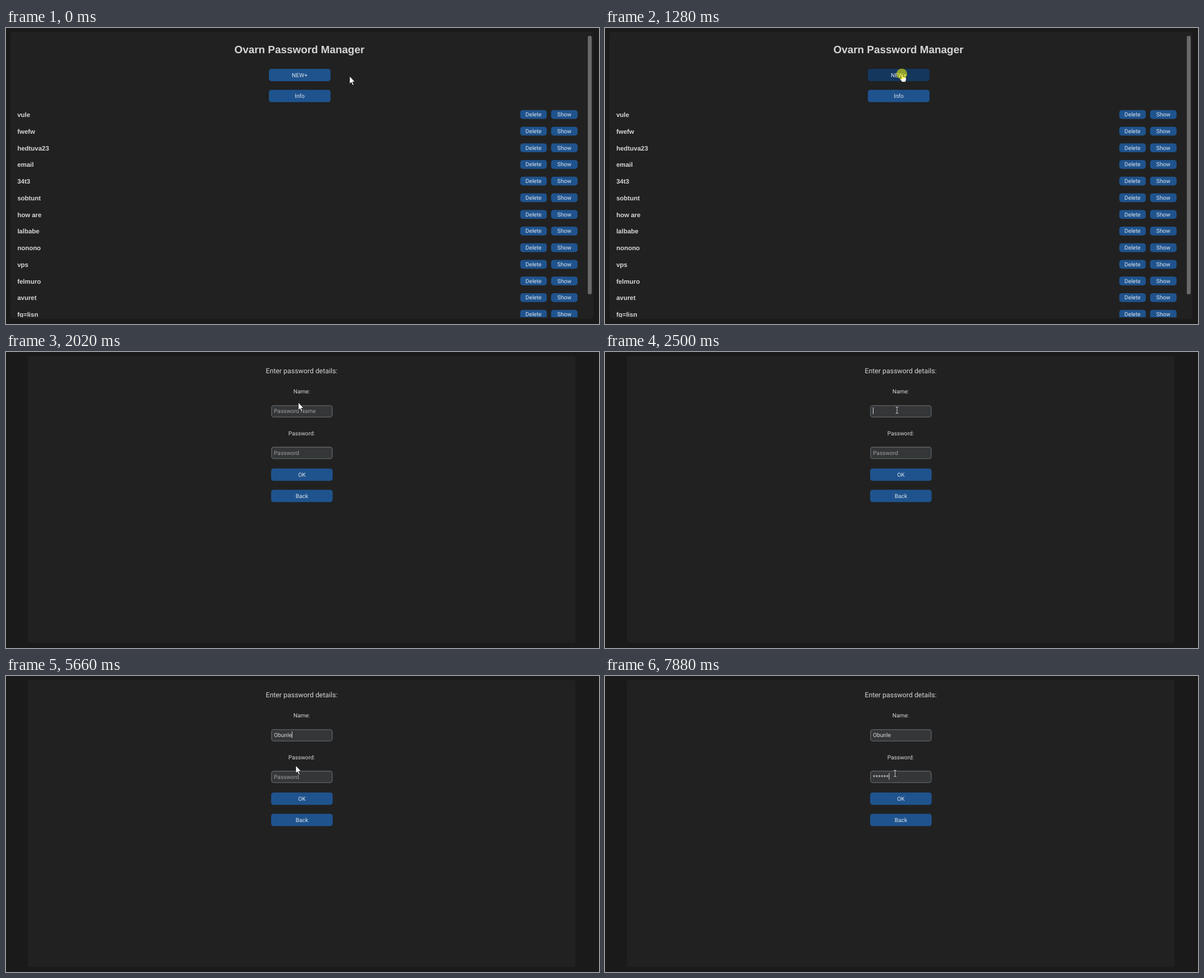
Animation of 1058x529 px, one loop 8000 ms. Source, as an HTML page:

```html
<!DOCTYPE html>
<html lang="en">
<head>
<meta charset="utf-8">
<title>Password manager</title>
<style>
  html, body { margin: 0; width: 100%; height: 100%; overflow: hidden; background: #1a1a1a; }
  svg { display: block; width: 1058px; height: 529px; }
  text { font: 10.2px Roboto, sans-serif; fill: #d6d6d6; text-rendering: geometricPrecision; white-space: pre; }
  .mid { text-anchor: middle; }
  .title { font: bold 18.9px "Liberation Sans", Arial, sans-serif; }
  .item { font: bold 11.45px "Liberation Sans", Arial, sans-serif; }
  .lead { font-size: 12.35px; }
  .cap { fill: #dce4ee; }
  .hint { fill: #9e9e9e; }
  .stars { letter-spacing: .35px; }
  .panel { fill: #212121; }
  .btn { fill: #1f538d; }
  .btn.hover { fill: #14375e; }
  .field { fill: #343638; stroke: #565b5e; stroke-width: 1.6; }
  .blank { fill: #1a1a1a; }
  .caret { fill: #d6d6d6; }
  .pointer { fill: #fff; stroke: #111; stroke-width: .8; stroke-linejoin: round; }
  .beam { fill: none; stroke: #c4c6c8; stroke-width: 1; }
</style>
</head>
<body>
<svg viewBox="0 0 1058 529">
  <defs><clipPath id="view"><rect width="1058" height="517"/></clipPath></defs>
  <g id="list">
    <rect class="panel" x="8" y="7" width="1040" height="513" rx="5"/>
    <rect x="1038" y="14" width="7" height="462" rx="3" fill="#696969"/>
    <g id="rows" clip-path="url(#view)"></g>
  </g>
  <g id="form">
    <rect class="panel" x="39" y="7" width="977" height="513" rx="4"/>
    <g id="blanks"></g>
    <g id="controls"></g>
  </g>
  <g id="mouse">
    <path id="arrow" class="pointer" d="M0 0V14L3.1 11.1L5.3 16.3L7.5 15.4L5.3 10.3H9.6Z"/>
    <path id="hand" class="pointer" d="M-1.3 1.2Q0 -.4 1.3 1.2V5.2Q2.6 4.4 3.4 5.6Q4.8 4.9 5.5 6.2Q7.3 5.8 7.4 7.6V10.6L6.2 14.6H-.2L-3.6 9.6Q-4.2 7.8 -2.7 7.9L-1.3 9.1Z"/>
    <path id="beam" class="beam" d="M-2.3 -5.5H2.3M0 -5.5V5.5M-2.3 5.5H2.3"/>
  </g>
  <circle id="click" r="9.5" fill="#ff0" fill-opacity=".52"/>
</svg>
<script>
const LOOP = 8000;
const $ = id => document.getElementById(id);

function add(parent, tag, attrs, text = '') {
  const node = document.createElementNS('http://www.w3.org/2000/svg', tag);
  for (const key in attrs) node.setAttribute(key, attrs[key]);
  node.textContent = text;
  parent.append(node);
  return node;
}
const box = (parent, cls, x, y, width, height, rx = 0) =>
  add(parent, 'rect', { class: cls, x, y, width, height, rx });
const label = (parent, cls, x, y, text) => add(parent, 'text', { class: cls, x, y }, text);
function button(parent, x, y, w, h, text) {
  const rect = box(parent, 'btn', x, y, w, h, 4.5);
  label(parent, 'mid cap', x + w / 2, y + h / 2 + 3.5, text);
  return rect;
}
const show = (node, on) => { node.style.display = on ? '' : 'none'; };

// List screen
label($('list'), 'mid title', 523.5, 44.8, 'Ovarn Password Manager');
const newButton = button($('list'), 469, 73, 110, 22, 'NEW+');
button($('list'), 469, 110.5, 110, 22, 'Info');
['vule', 'fwefw', 'hedtuva23', 'email', '34t3', 'sobtunt', 'how are', 'lalbabe',
 'nonono', 'vps', 'felmuro', 'avuret', 'fg=lisn'].forEach((name, i) => {
  const y = 155 + i * 29.75;
  label($('rows'), 'item', 20.2, y + 4, name);
  button($('rows'), 917.5, y - 8.3, 47.3, 15.7, 'Delete');
  button($('rows'), 972.5, y - 8.3, 47.3, 15.7, 'Show');
});

// Form screen
const blank = (y, w) => box($('blanks'), 'blank', 527.7 - w / 2, y, w, 22);
blank(22, 128);
blank(59, 29);
blank(134, 47);
[95, 169, 208, 246].forEach(y => blank(y, 110));

const controls = $('controls');
label(controls, 'mid lead', 527.5, 37.6, 'Enter password details:');
label(controls, 'mid', 527.5, 74, 'Name:');
label(controls, 'mid', 527.5, 148.5, 'Password:');
button(controls, 473, 208.3, 109.8, 22, 'OK');
button(controls, 473, 246.2, 109.8, 22, 'Back');

function field(y, hint, value, cls, focus, keys, blinks) {
  box(controls, 'field', 473.8, y + .8, 108.2, 20.4, 4);
  const hintText = label(controls, 'hint', 478, y + 14.2, hint);
  const text = label(controls, cls, 478, y + 14.2, '');
  const caret = box(controls, 'caret', 478, y + 4, 1, 12);
  return t => {
    show(hintText, t < focus);
    text.textContent = value.slice(0, keys.filter(k => t >= k).length);
    const end = text.textContent ? text.getComputedTextLength() : 0;
    caret.setAttribute('x', 478 + end);
    show(caret, blinks.some(([on, off]) => t >= on && t < off));
  };
}
const fields = [
  field(95, 'Password Name', 'Obunle', '', 2360,
    [3580, 4030, 4100, 4250, 4580, 4920],
    [[2360, 2960], [3310, 3910], [4250, 4850], [5120, 5730]]),
  field(169.3, 'Password', '******', 'stars', 6020,
    [7210, 7480, 7620, 7690, 7760, 7880],
    [[6020, 6610], [6940, 7550], [7880, LOOP]])
];

// Pointer moves: start time, step length, points visited one per step
const moves = [
  [470, 68, Array.from({ length: 10 }, (_, i) => {
    const k = Math.sin((i + 1) / 10 * Math.PI / 2);
    return [613 - 83 * k, 86 - 4 * k];
  })],
  [1880, 70, [[527, 83], [524, 86], [521.5, 90], [521, 95], [521, 99], [521, 102], [521, 104]]],
  [5520, 70, [[520, 122], [518, 144], [517, 160], [517, 167], [517.5, 172], [517.5, 174]]]
];
const clicks = [1280, 2360, 6020];

function pointerAt(t) {
  let point = [613, 86];
  for (const [start, step, path] of moves) {
    if (t >= start) point = path[Math.min(path.length - 1, Math.floor((t - start) / step))];
  }
  return point;
}

function draw(t) {
  const inForm = t >= 1420, ready = t >= 1490;
  show($('list'), !inForm);
  show($('form'), inForm);
  show($('blanks'), !ready);
  show(controls, ready);
  if (ready) fields.forEach(update => update(t));

  const [x, y] = pointerAt(t);
  const hover = !inForm && x < 579;
  const typing = ready && ((y >= 95 && y < 117) || (y >= 169 && y < 191));
  newButton.classList.toggle('hover', hover);
  show($('hand'), hover);
  show($('beam'), typing);
  show($('arrow'), !hover && !typing);
  $('mouse').setAttribute('transform', `translate(${x} ${y})`);

  const click = $('click');
  show(click, clicks.some(c => t >= c && t < c + (c === 6020 ? 120 : 140)));
  click.setAttribute('cx', x - .5);
  click.setAttribute('cy', y);
}

function tick() {
  draw(performance.now() % LOOP);
  requestAnimationFrame(tick);
}
tick();
</script>
</body>
</html>
```
